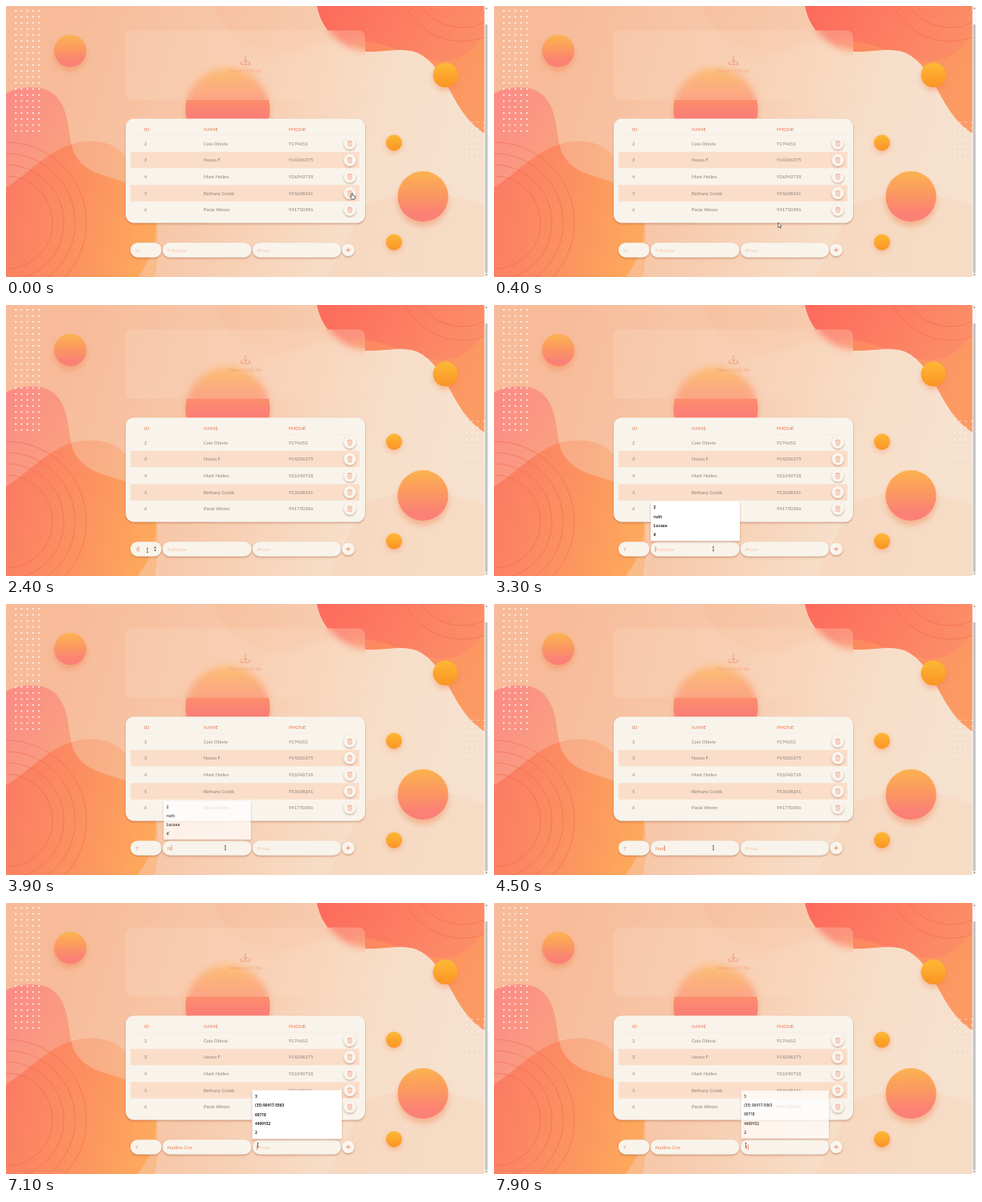
An HTML page for the animation above (8 s loop, 600 px wide and 338 px high).

```html
<!DOCTYPE html>
<html lang="en">
<head>
<meta charset="utf-8">
<title>Contact form</title>
<style>
  html, body { margin: 0; width: 100%; height: 100%; overflow: hidden; background: #f6c6a8; }
  svg { display: block; width: 600px; height: 338px; }
  text { font-family: Lato, "Open Sans", sans-serif; font-size: 5.8px; }
  .head { fill: #ea7a52; font-size: 6.1px; }
  .cell { fill: #8f817a; }
  .hint { fill: #f9c3a6; font-size: 6px; }
  .value { fill: #ec7c56; font-size: 6px; }
  .popup text { font: bold 4.8px "Open Sans", "Noto Sans", sans-serif; fill: #262626; }
  .line { fill: none; stroke: #ee8a64; stroke-linecap: round; stroke-linejoin: round; }
  .rings circle { fill: none; stroke: #ee5c40; stroke-width: .7; opacity: .65; }
</style>
</head>
<body>
<svg viewBox="0 0 600 338" xmlns="http://www.w3.org/2000/svg">
  <defs>
    <linearGradient id="base" gradientUnits="userSpaceOnUse" x1="60" y1="90" x2="540" y2="230">
      <stop offset="0" stop-color="#f7bb99"/>
      <stop offset=".4" stop-color="#f7c8aa"/>
      <stop offset=".8" stop-color="#f7dec8"/>
      <stop offset="1" stop-color="#f6e1ce"/>
    </linearGradient>
    <linearGradient id="pink" gradientUnits="userSpaceOnUse" x1="0" y1="130" x2="90" y2="180">
      <stop offset="0" stop-color="#fb8d86"/><stop offset="1" stop-color="#f9a27e"/>
    </linearGradient>
    <linearGradient id="amber" x1="0" y1=".4" x2="1" y2=".6">
      <stop offset="0" stop-color="#fb7c64"/><stop offset=".5" stop-color="#fc9160"/><stop offset="1" stop-color="#fdaa5c"/>
    </linearGradient>
    <linearGradient id="coral" x1="0" y1=".1" x2="1" y2=".5">
      <stop offset="0" stop-color="#fd6b5c"/><stop offset=".55" stop-color="#fc8164"/><stop offset="1" stop-color="#fb9468"/>
    </linearGradient>
    <linearGradient id="sunset" x1="0" y1="0" x2="0" y2="1">
      <stop offset="0" stop-color="#fcb350"/><stop offset=".45" stop-color="#fb9861"/><stop offset=".85" stop-color="#fb8076"/>
    </linearGradient>
    <linearGradient id="dusk" x1="0" y1="0" x2="0" y2="1">
      <stop offset="0" stop-color="#fcb350"/><stop offset=".36" stop-color="#fc906a"/><stop offset=".56" stop-color="#fb8076"/>
    </linearGradient>
    <linearGradient id="gold" x1="0" y1="0" x2="0" y2="1">
      <stop offset="0" stop-color="#fdb936"/><stop offset="1" stop-color="#fb9324"/>
    </linearGradient>
    <filter id="soft" x="-50%" y="-50%" width="200%" height="200%"><feGaussianBlur stdDeviation="3.5"/></filter>
    <filter id="frost" filterUnits="userSpaceOnUse" x="0" y="0" width="600" height="338"><feGaussianBlur stdDeviation="4"/></filter>
    <filter id="lift" x="-30%" y="-30%" width="160%" height="170%">
      <feDropShadow dx="0" dy="1.2" stdDeviation="1.3" flood-color="#a0522d" flood-opacity=".52"/>
    </filter>
    <path id="leftWave" d="M0 109C14 100 48 97 62 112C80 131 76 158 84 182C98 212 132 212 152 222C194 246 198 292 164 338H0Z"/>
    <path id="leftHill" d="M0 226C28 210 52 178 90 170C130 164 152 180 158 208C163 232 186 246 189 282Q191 310 185 338H0Z"/>
    <path id="corner" d="M387 0C392 27 414 54 446 57C474 58 500 48 520 63C552 84 558 140 600 161V0Z"/>
    <clipPath id="inWave"><use href="#leftWave"/></clipPath>
    <clipPath id="inCorner"><use href="#corner"/></clipPath>
    <clipPath id="pane"><rect x="149" y="30.5" width="298" height="86.5" rx="8"/></clipPath>
    <g id="bin" class="line" stroke-width=".5">
      <path d="M-2.9-2.2H2.9M-1.2-2.3V-3.4H1.2V-2.3M-2.3-2.1L-2 3.5H2L2.3-2.1M-.8-.8V2.2M.8-.8V2.2"/>
    </g>
  </defs>

  <g id="bg">
    <rect width="600" height="338" fill="url(#base)"/>
    <path fill="#f4b592" opacity=".3" d="M259 0C268 32 305 62 340 60C375 57 400 35 446 48V0Z"/>
    <path fill="#f4c4a4" opacity=".22" d="M447 248C480 232 540 226 600 252V338H400Z"/>
    <use href="#leftHill" fill="url(#amber)" opacity=".4"/>
    <use href="#leftWave" fill="url(#pink)"/>
    <g clip-path="url(#inWave)"><use href="#leftHill" fill="url(#amber)"/></g>
    <g class="rings">
      <circle cx="0" cy="270" r="58"/><circle cx="0" cy="270" r="72"/>
      <circle cx="0" cy="270" r="86"/><circle cx="0" cy="270" r="100"/>
    </g>
    <use href="#corner" fill="url(#coral)"/>
    <path clip-path="url(#inCorner)" fill="#fca45a" opacity=".4" d="M430 44C470 40 500 66 540 68C570 70 585 50 600 30V170H430Z"/>
    <g class="rings"><circle cx="568" cy="-35" r="79"/><circle cx="568" cy="-35" r="62"/></g>
    <g id="dots" fill="#fff"></g>
    <g id="balls"></g>
  </g>

  <g clip-path="url(#pane)">
    <use href="#bg" filter="url(#frost)"/>
    <rect x="149" y="30" width="298" height="88" fill="#fbd9c4" opacity=".3"/>
  </g>
  <path class="line" stroke-width=".75" d="M298 63V70.3M295.3 67.8L298 70.4L300.7 67.8M292.8 69.3V72.8H303.2V69.3"/>
  <text x="298" y="83.2" text-anchor="middle" fill="#f08a62" opacity=".6">Select a CSV file</text>

  <rect x="149" y="140.5" width="298" height="130" rx="10" fill="#f8f4ec" filter="url(#lift)"/>
  <path d="M155 161.3H440" stroke="#f3e6da" stroke-width=".6"/>
  <g id="table"></g>

  <g id="form"></g>
  <g id="popups"></g>

  <g id="bar">
    <rect x="595.5" width="4.5" height="338" fill="#f8f8f8"/>
    <rect x="596.4" y="23" width="3" height="310" fill="#c1c1c1"/>
    <path d="M596.8 3.6L598 2L599.2 3.6ZM596.8 334.6L598 336.2L599.2 334.6Z" fill="#555"/>
  </g>

  <g id="cursor">
    <path data-kind="hand" d="M-1 0Q0-1.4 .8 0V2.4L3.2 3Q4 3.2 3.8 4.4L3 7H-.6L-2.8 4Q-2.6 2.8-1 4Z" fill="#fff" stroke="#222" stroke-width=".7"/>
    <path data-kind="arrow" d="M0 0V6.4L1.5 5.1L2.5 7.3L3.5 6.8L2.5 4.7H4.5Z" fill="#fff" stroke="#222" stroke-width=".6"/>
    <path data-kind="beam" d="M-1-2.6H1M0-2.6V2.6M-1 2.6H1" fill="none" stroke="#4a3a36" stroke-width=".65"/>
  </g>
</svg>

<script>
const $ = id => document.getElementById(id);
const text = (x, y, cls, s) => `<text x="${x}" y="${y}" class="${cls}">${s}</text>`;

// Background dots and balls
function dotGrid(x0, y0, cols, rows, alpha) {
  let out = "";
  for (let i = 0; i < cols * rows; i++) {
    out += `<circle cx="${x0 + (i % cols) * 7.2}" cy="${y0 + Math.floor(i / cols) * 7.5}" r="1.1" opacity="${alpha}"/>`;
  }
  return out;
}
$("dots").innerHTML = dotGrid(12.2, 6, 5, 21, .9) + dotGrid(573, 145, 4, 7, .5);

const ball = (x, y, r, fill) =>
  `<circle cx="${x}" cy="${y + Math.min(r * .25, 6)}" r="${r}" fill="#f0804a" opacity=".42" filter="url(#soft)"/>
   <circle cx="${x}" cy="${y}" r="${r}" fill="url(#${fill})"/>`;
$("balls").innerHTML = [
  [80, 56, 20, "sunset"], [276, 129, 52.5, "dusk"], [519, 237.5, 31.5, "sunset"],
  [547, 86, 15.5, "gold"], [483, 170.5, 10, "gold"], [483, 294.5, 10, "gold"]
].map(b => ball(...b)).join("");

// Table
const people = [
  [2, "Caio Otávio", "9174652"],
  [3, "Neusa F.", "914206375"],
  [4, "Mark Hollen", "926340718"],
  [5, "Bethany Crobb", "953608241"],
  [6, "Paula Wrenn", "941750386"]
];
const disc = (x, y, r) => `<circle cx="${x}" cy="${y}" r="${r}" fill="#f9f5ee" filter="url(#lift)"/>`;
$("table").innerHTML =
  text(172, 155.8, "head", "ID") + text(246, 155.8, "head", "NAME") + text(352, 155.8, "head", "PHONE") +
  people.map(([id, name, phone], i) => {
    const y = 171.4 + i * 20.7;
    const stripe = i % 2 ? `<rect x="155" y="${y - 10.3}" width="285" height="20.6" fill="#fbdeca"/>` : "";
    return stripe + text(172, y + 2.1, "cell", id) + text(246, y + 2.1, "cell", name) +
      text(352, y + 2.1, "cell", phone) + disc(428, y, 7.6) + `<use href="#bin" x="428" y="${y}"/>`;
  }).join("");

// Form fields
const fields = {
  id: { x: 155, w: 38.5, tx: 161, hint: "ID", steps: [[2400, "7"]], focus: [2100, 2900] },
  name: {
    x: 195, w: 110.5, tx: 201, hint: "Fullname", focus: [2900, 6900],
    steps: [[3800, "N"], [4200, "Na"], [4500, "Nad"], [4600, "Nadi"], [4700, "Nadin"], [4900, "Nadine"],
            [5100, "Nadine\u00a0"], [5500, "Nadine C"], [5900, "Nadine Co"], [6000, "Nadine Coe"]]
  },
  phone: { x: 307, w: 110, tx: 312.5, hint: "Phone", steps: [[7800, "1"]], focus: [6900, 8000] }
};
$("form").innerHTML = Object.entries(fields).map(([key, f]) =>
  `<rect x="${f.x}" y="295.2" width="${f.w}" height="18.3" rx="9" fill="#f8f4ec" filter="url(#lift)"/>
   <text id="${key}" x="${f.tx}" y="306.5"></text>
   <rect id="${key}Caret" y="301" width=".6" height="7" fill="#d9603c"/>`).join("") +
  `<path id="spinner" d="M183.9 303.2L185.6 301.2L187.3 303.2ZM183.9 305.2L185.6 307.2L187.3 305.2Z" fill="#555"/>` +
  disc(426, 304.3, 7.8) + `<path class="line" stroke-width="1" d="M423.7 304.3H428.3M426 302V306.6"/>`;

// Suggestion lists
const popups = [
  { x: 195, y: 245, w: 111, from: 3300, fade: 3800, items: ["2", "ruth", "Lucaaa", "d"] },
  { x: 306.5, y: 233.5, w: 111.5, from: 7100, fade: 7800, items: ["3", "(35) 90417-5563", "60718", "4409152", "2"] }
];
$("popups").innerHTML = popups.map(p => {
  const rows = p.items.map((s, i) => text(p.x + 3.6, p.y + 9.4 + i * 11.3, "", s)).join("");
  return `<g class="popup"><rect x="${p.x}" y="${p.y}" width="${p.w}" height="${294.3 - p.y}" rx="1" fill="#fff" filter="url(#lift)"/>${rows}</g>`;
}).join("");
const popupNodes = [...$("popups").children];

// Pointer path: time, x, y, shape from that time on
const path = [
  [0, 431, 234, "hand"], [100, 431, 234, "hand"], [200, 421, 240, "arrow"], [500, 320, 285, "arrow"],
  [900, 209, 319, "arrow"], [1100, 184, 315, "beam"], [1200, 176.5, 313, "beam"], [1600, 176, 306, "beam"],
  [2400, 176, 306, "beam"], [2700, 232, 294, "beam"], [3000, 273, 304, "beam"],
  [6400, 273, 304, "beam"], [6900, 313.5, 302, "beam"], [8000, 313.5, 302, "beam"]
];
const latest = (steps, t) => steps.filter(s => s[0] <= t).pop();

function drawPointer(t) {
  const i = Math.max(1, path.findIndex(p => p[0] > t));
  const a = path[i - 1], b = path[i];
  const k = (t - a[0]) / (b[0] - a[0]);
  const x = a[1] + (b[1] - a[1]) * k, y = a[2] + (b[2] - a[2]) * k;
  $("cursor").setAttribute("transform", `translate(${x} ${y})`);
  for (const shape of $("cursor").children) {
    shape.style.display = shape.dataset.kind === a[3] ? "" : "none";
  }
}

function drawFields(t) {
  for (const [key, f] of Object.entries(fields)) {
    const typed = latest(f.steps, t);
    const node = $(key), caret = $(key + "Caret");
    node.textContent = typed ? typed[1] : f.hint;
    node.setAttribute("class", typed ? "value" : "hint");
    caret.setAttribute("x", f.tx + (typed ? node.getComputedTextLength() + .2 : -.3));
    caret.style.display = t >= f.focus[0] && t < f.focus[1] ? "" : "none";
  }
  $("spinner").style.display = t >= 1100 && t < 2600 ? "" : "none";
}

function drawPopups(t) {
  popups.forEach((p, i) => {
    const age = t - p.fade;
    const alpha = t < p.from ? 0 : age < 0 ? 1 : [.92, .74, .35][age / 100] || 0;
    const scale = age < 0 ? 1 : .98;
    const cx = p.x + p.w / 2, cy = (p.y + 294.3) / 2;
    popupNodes[i].style.opacity = alpha;
    popupNodes[i].setAttribute("transform", `translate(${cx} ${cy}) scale(${scale}) translate(${-cx} ${-cy})`);
  });
}

const LOOP = 8000, TICK = 100;
const start = performance.now();
let shown = -1;
function frame() {
  const t = Math.floor(((performance.now() - start) % LOOP) / TICK) * TICK;
  if (t !== shown) {
    shown = t;
    drawPointer(t);
    drawFields(t);
    drawPopups(t);
  }
  requestAnimationFrame(frame);
}
frame();
</script>
</body>
</html>
```
